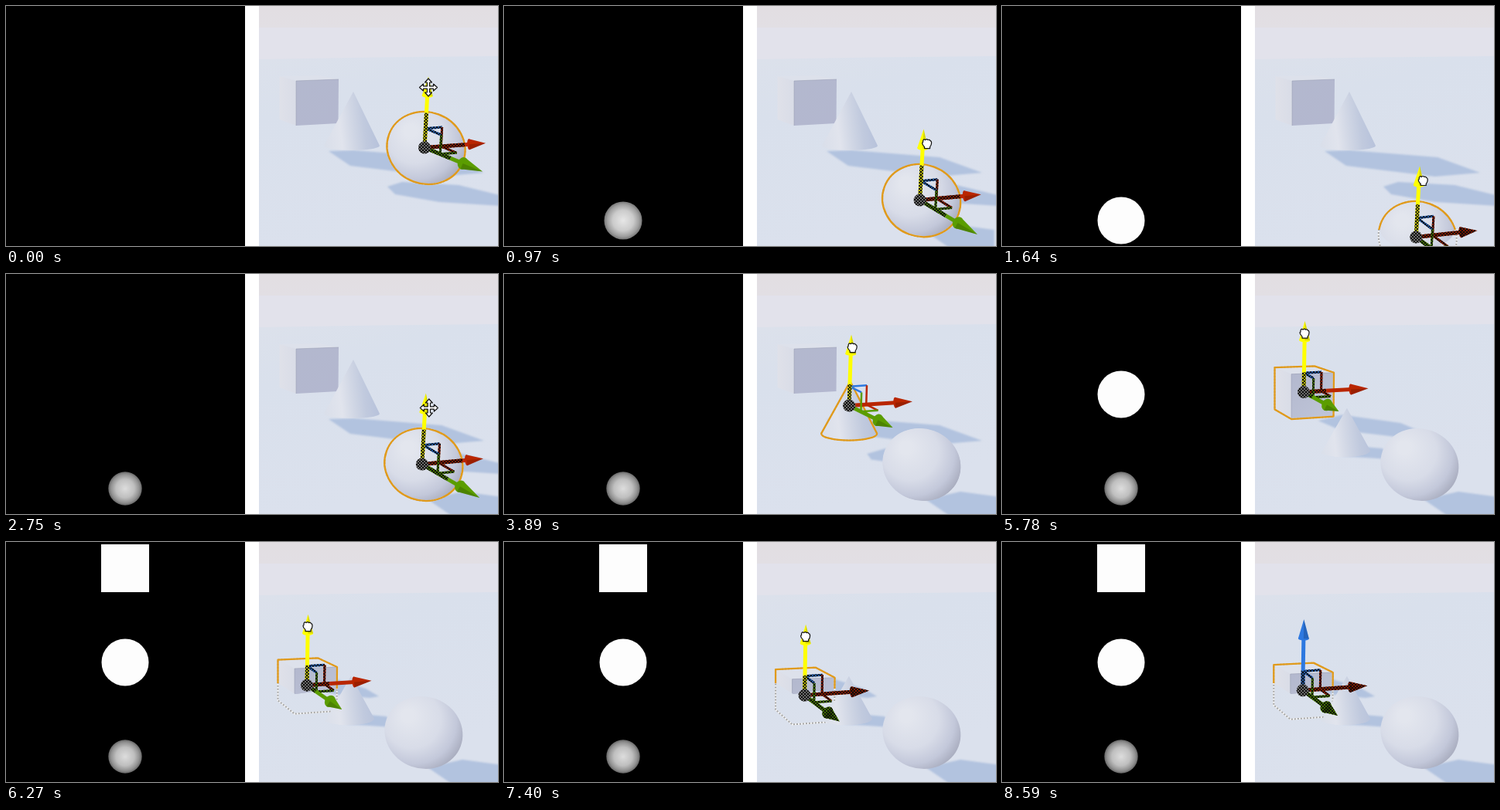
These frames come from a looping animation (636 px wide and 311 px high, 8620 ms). An HTML page with a canvas:

```html
<!DOCTYPE html>
<html lang="en">
<head>
<meta charset="utf-8">
<title>Depth mask</title>
<style>
html, body { margin: 0; width: 100%; height: 100%; overflow: hidden; background: #fff; }
canvas { display: block; }
</style>
</head>
<body>
<canvas id="stage" width="636" height="311"></canvas>
<script>
const LOOP = 8620;
const c = document.getElementById('stage').getContext('2d');
const BLUE = '#2d78e0', YELLOW = '#ffff00', RED = '#b92600', GREEN = '#5b9d00';
const ORANGE = '#e09a1b', SHADOW = '#b2c3df';

// [time, value] keys, values may be numbers or points
const sphereKeys = [[0, 184], [120, 184], [880, 238], [970, 252], [1480, 297], [1640, 300], [1860, 300], [2500, 247]];
const coneKeys = [[3560, 0], [4300, 63]];
const cubeKeys = [[5400, 0], [6180, 67], [6270, 67], [6550, 62], [7130, 77], [7500, 82], [8000, 77], [8200, 74]];
const pointerKeys = [[2830, [546, 173]], [3000, [449, 160]], [3080, [449, 160]], [3350, [452, 70]],
  [4550, [449, 129]], [4750, [403, 115]], [4950, [403, 115]], [5200, [392, 46]]];
const modes = [[100, 'move'], [2600, 'hand'], [2830, 'move'], [3350, 'cross'], [3540, 'move'], [4400, 'hand'],
  [4550, 'move'], [5200, 'cross'], [5380, 'move'], [8250, 'hand'], [LOOP, 'none']];

const lerp = (a, b, k) => a + (b - a) * k;
const clamp = k => Math.max(0, Math.min(1, k));
const mixPoint = (a, b, k) => [lerp(a[0], b[0], k), lerp(a[1], b[1], k)];
const mixPoly = (a, b, k) => a.map((p, i) => mixPoint(p, b[i], k));
const add = (...ps) => ps.reduce((a, b) => [a[0] + b[0], a[1] + b[1]]);
const mul = (p, k) => [p[0] * k, p[1] * k];

function track(keys, t) {
  if (t <= keys[0][0]) return keys[0][1];
  for (let i = 1; i < keys.length; i++) {
    const [t0, a] = keys[i - 1], [t1, b] = keys[i];
    if (t < t1) {
      const k = (t - t0) / (t1 - t0);
      return Array.isArray(a) ? mixPoint(a, b, k * k * (3 - 2 * k)) : lerp(a, b, k);
    }
  }
  return keys[keys.length - 1][1];
}

function polygon(points, closed = true) {
  const p = new Path2D();
  points.forEach(([x, y]) => p.lineTo(x, y));
  if (closed) p.closePath();
  return p;
}
function ellipse(x, y, rx, ry, tilt = 0) {
  const p = new Path2D();
  p.ellipse(x, y, rx, ry, tilt, 0, 7);
  return p;
}
function fill(path, style) { c.fillStyle = style; c.fill(path); }
function stroke(path, style, width) {
  c.strokeStyle = style;
  c.lineWidth = width;
  c.stroke(path);
}
function gradient(x0, y0, x1, y1, ...stops) {
  const g = c.createLinearGradient(x0, y0, x1, y1);
  stops.forEach(([k, col]) => g.addColorStop(k, col));
  return g;
}
function within(path, draw) {
  c.save();
  c.clip(path);
  draw();
  c.restore();
}

const checker = (() => {
  const tile = document.createElement('canvas');
  tile.width = tile.height = 4;
  const g = tile.getContext('2d');
  g.fillStyle = 'rgba(0,0,0,.3)';
  g.fillRect(0, 0, 4, 4);
  g.fillStyle = '#0c0c0c';
  g.fillRect(0, 0, 2, 2);
  g.fillRect(2, 2, 2, 2);
  return c.createPattern(tile, 'repeat');
})();

// Everything above the floor line where a round body sinks in
function roundFloor(x, y, rx, ry) {
  const p = new Path2D();
  p.rect(327, 0, 309, y);
  p.ellipse(x, y, rx, ry, 0, 0, Math.PI);
  return p;
}
const sphereFloor = roundFloor(537, 290, 48, 25);
const coneFloor = roundFloor(443, 229, 33, 8);
const cubeFloor = polygon([[327, 0], [636, 0], [636, 188], [428, 190], [374, 197], [352, 183], [327, 183]]);

// Body parts that have sunk keep a dotted outline
function outline(path, floor) {
  c.lineJoin = 'round';
  stroke(path, '#f4f4f4', 2);
  c.setLineDash([2, 2]);
  stroke(path, '#a6a6a6', 2);
  c.setLineDash([]);
  within(floor, () => stroke(path, ORANGE, 2.3));
}

function drawGround() {
  fill(polygon([[327, 0], [636, 0], [636, 40], [327, 40]]), gradient(0, 0, 0, 30, [0, '#e2dee2'], [1, '#e2dfe4']));
  fill(polygon([[327, 28], [636, 28], [636, 80], [327, 80]]), '#e2e2eb');
  const p = new Path2D('M327 69Q480 66 636 65V311H327Z');
  fill(p, gradient(327, 68, 400, 311, [0, '#dce1eb'], [.3, '#d9e0ec'], [1, '#dbe1ed']));
}

function drawShadows(cy, coneD, cubeD) {
  const shade = points => fill(polygon(points), SHADOW);
  c.save();
  c.filter = 'blur(1.2px)';
  shade(mixPoly(
    [[417, 188], [450, 187], [563, 196], [618, 216], [560, 221], [445, 207]],
    [[400, 192], [428, 178], [465, 190], [482, 200], [470, 202], [430, 198]], clamp(cubeD / 67)));
  shade(mixPoly(
    [[493, 234], [512, 228], [585, 232], [642, 246], [642, 259], [560, 254], [503, 244]],
    [[440, 232], [468, 224], [480, 225], [492, 226], [500, 240], [470, 238], [440, 236]], clamp(coneD / 63)));
  const ball = [[545, 292], [590, 282], [642, 289], [642, 316], [580, 316]];
  shade(cy < 247
    ? ball.map(p => add(p, mul([95, 25], (247 - cy) / 63)))
    : mixPoly(ball, ball.map(() => [555, 300]), (cy - 247) / 53));
  c.restore();
}

function drawCube(d, selected) {
  const at = (x, y, rate) => [x - .03 * d, y + rate * d];
  const tl = at(375, 97, 1), tr = at(430, 95, 1), br = at(429.5, 152, 1), bl = at(375, 155, 1.01);
  const backTop = at(353.5, 91, .92), backLow = at(353.5, 147, .87), backRight = at(405, 90, .9);
  within(cubeFloor, () => {
    fill(polygon([backTop, backRight, tr, tl]), '#dde1eb');
    fill(polygon([backTop, tl, bl, backLow]), gradient(353, 0, 375, 0, [0, '#dfe1e9'], [1, '#d9dce7']));
    fill(polygon([tl, tr, br, bl]), gradient(375, tl[1], 430, bl[1], [0, '#b3b8ce'], [1, d > 30 ? '#c0c6d9' : '#b3b7cf']));
    stroke(polygon([tr, tl, bl], false), 'rgba(145,150,172,.45)', 1);
  });
  if (selected) outline(polygon([backTop, backRight, tr, br, bl, backLow]), cubeFloor);
}

function drawCone(d, selected) {
  const apex = [449 - .05 * d, 111 + d];
  const x = 447 - .03 * d, y = 181 + .91 * d, ry = 6 + .105 * d;
  const body = new Path2D();
  body.moveTo(...apex);
  body.lineTo(x + 36, y);
  body.ellipse(x, y, 36, ry, 0, 0, Math.PI);
  body.closePath();
  within(coneFloor, () => fill(body, gradient(x - 33, y, x + 35, y - 8,
    [0, '#dadfea'], [.3, '#e1e4ed'], [.52, '#d1d7e5'], [.75, '#c1cade'], [1, '#b7c2db'])));
  if (selected) outline(body, coneFloor);
}

const sphereX = cy => 543 - .05 * (cy - 184);
const spherePath = cy => ellipse(sphereX(cy), cy, 51, 46.5, .35);

function drawSphere(cy, selected) {
  const x = sphereX(cy), body = spherePath(cy);
  const g = c.createRadialGradient(x - 20, cy - 22, 8, x - 10, cy - 12, 66);
  g.addColorStop(0, '#e3e6ee');
  g.addColorStop(.5, '#d8dce8');
  g.addColorStop(.8, '#c3c8da');
  g.addColorStop(1, '#a9adbf');
  within(sphereFloor, () => fill(body, g));
  if (selected) outline(body, sphereFloor);
}

function hiddenStroke(path, col, width) {
  stroke(path, col, width);
  stroke(path, checker, width);
}

function drawHead(base, tip, col, hidden, round) {
  const a = Math.atan2(tip[1] - base[1], tip[0] - base[0]);
  const side = [-Math.sin(a), Math.cos(a)];
  const w = round ? 8 : 7;
  const head = polygon([add(base, mul(side, w)), tip, add(base, mul(side, -w))]);
  const cap = ellipse(...base, round ? 6.5 : 2.5, w, a);
  fill(cap, col);
  fill(head, col);
  fill(polygon([add(base, mul(side, w)), tip, base]), 'rgba(0,0,0,.16)');
  if (hidden) {
    fill(cap, checker);
    fill(head, checker);
  }
}

function drawAxis(o, v, col, hide, round) {
  const tip = add(o, v), base = add(o, mul(v, round ? .66 : .73)), mid = add(o, mul(v, Math.min(hide, .73)));
  c.lineCap = 'butt';
  hiddenStroke(polygon([o, mid], false), col, 5);
  if (hide < .73) stroke(polygon([mid, base], false), col, 5);
  drawHead(base, tip, col, hide >= 1, round);
}

// hide: share of the up, red and green shafts inside the body
function drawGizmo(o, upCol, hide, inside) {
  const [x, y] = o;
  const up = [lerp(1.5, 5, (x - 389) / 152), -92];
  const red = [lerp(83.5, 79, (x - 389) / 152), -6 - .025 * (y - 195)];
  const green = [.196 * x - 31, 31 + .2 * (y - 184)];
  const [u, r, g] = [up, red, green].map(v => mul(v, .27));
  drawAxis(o, red, RED, hide[1]);
  const edge = (a, b, col) => {
    const p = polygon([add(o, a), add(o, b)], false);
    inside ? hiddenStroke(p, col, 3) : stroke(p, col, 2.5);
  };
  edge(u, add(u, r), BLUE);
  edge(r, add(u, r), RED);
  edge(r, add(r, g), RED);
  edge(u, add(u, g), BLUE);
  edge(g, add(u, g), GREEN);
  edge(g, add(r, g), GREEN);
  drawAxis(o, green, GREEN, hide[2], true);
  drawAxis(o, up, upCol, hide[0]);
  const hub = ellipse(x, y, 8, 8);
  fill(hub, '#9b9b9b');
  fill(hub, checker);
}

function drawPointer(mode, [x, y]) {
  c.save();
  c.translate(x, y);
  c.lineJoin = 'round';
  if (mode === 'cross') {
    stroke(new Path2D('M-12 0H12M0-12V12'), '#454039', 2);
  } else if (mode === 'move') {
    const arm = [[-1.6, -1.6], [-1.6, -6.5], [-4.5, -6.5], [0, -11.5], [4.5, -6.5], [1.6, -6.5]];
    const points = [];
    for (let i = 0; i < 4; i++) {
      const s = Math.round(Math.sin(i * Math.PI / 2)), k = Math.round(Math.cos(i * Math.PI / 2));
      arm.forEach(([a, b]) => points.push([a * k - b * s, a * s + b * k]));
    }
    fill(polygon(points), '#fff');
    stroke(polygon(points), '#111', 1.2);
  } else if (mode === 'hand') {
    const fist = new Path2D('M-5-4Q-4-7-2-5Q0-7 1.5-5Q3.5-6 4.3-4Q6-4 6-1Q6 2 4 4V6H-3V4Q-6 1-6-1Q-6-2-5-2Z');
    fill(fist, '#fff');
    stroke(fist, '#111', 1.2);
  }
  c.restore();
}

function drawMask(cy, coneD, cubeD) {
  fill(polygon([[0, 0], [309, 0], [309, 311], [0, 311]]), '#000');
  const grey = k => { const v = Math.round(253 * clamp(k)); return `rgb(${v},${v},${v})`; };
  const h = (cy - 233) / 47;
  if (h > 0) {
    const r = 30.5 * Math.sqrt(1 - (1 - Math.min(h, 1)) ** 2);
    const core = .76 + .38 * h, rim = .25 + .53 * h;
    const g = c.createRadialGradient(154, 278, 0, 154, 278, r);
    g.addColorStop(0, grey(core));
    g.addColorStop(.55, grey(lerp(core, rim, .25)));
    g.addColorStop(.85, grey(lerp(core, rim, .65)));
    g.addColorStop(1, grey(rim));
    fill(ellipse(154, 278, r, r), g);
  }
  if (coneD > 45) fill(ellipse(154, 156, 30.5, 30.5), grey(.3 + (coneD - 45) / 14));
  if (cubeD > 42) fill(polygon([[123, 3], [185, 3], [185, 65], [123, 65]]), grey(.3 + (cubeD - 42) / 14));
}

function draw(t) {
  const cy = track(sphereKeys, t), coneD = track(coneKeys, t), cubeD = track(cubeKeys, t);
  const mode = modes.find(m => t < m[0])[1];
  const picked = t < 3050 ? 'sphere' : t < 4900 ? 'cone' : 'cube';
  const upCol = mode === 'move' || mode === 'hand' ? YELLOW : BLUE;

  c.clearRect(0, 0, 636, 311);
  drawMask(cy, coneD, cubeD);

  c.save();
  c.beginPath();
  c.rect(327, 0, 309, 311);
  c.clip();
  drawGround();
  drawShadows(cy, coneD, cubeD);
  drawCube(cubeD, false);
  drawCone(coneD, picked === 'cone');
  drawSphere(cy, picked === 'sphere');

  let o, grip;
  if (picked === 'sphere') {
    o = [sphereX(cy) - 2, cy - .5];
    grip = [lerp(5, 9, clamp((cy - 184) / 50)), lerp(-78, -73, clamp((cy - 184) / 50))];
    drawGizmo(o, upCol, cy > 285 ? [.46, 1, 1] : [.49, .66, .45], true);
  } else if (picked === 'cone') {
    o = [447 - .03 * coneD, 143 + .98 * coneD];
    grip = [4, -75];
    drawGizmo(o, upCol, [.3, .1, .1], false);
    within(spherePath(cy), () => {
      drawSphere(cy, false);
      drawGizmo(o, upCol, [.3, 1, 1], false);
    });
  } else {
    o = [391 - .03 * cubeD, 122 + .95 * cubeD];
    grip = [1, -76];
    // redraw with its outline above the neighbours, then restore the cone in front
    drawCube(cubeD, true);
    drawCone(coneD, false);
    drawGizmo(o, upCol, cubeD > 72 ? [.28, 1, 1] : [.28, .35, .25], true);
  }
  drawPointer(mode, mode === 'cross' ? track(pointerKeys, t) : add(o, grip));
  c.restore();
}

const start = performance.now();
function tick() {
  draw((performance.now() - start) % LOOP);
  requestAnimationFrame(tick);
}
tick();
</script>
</body>
</html>
```
